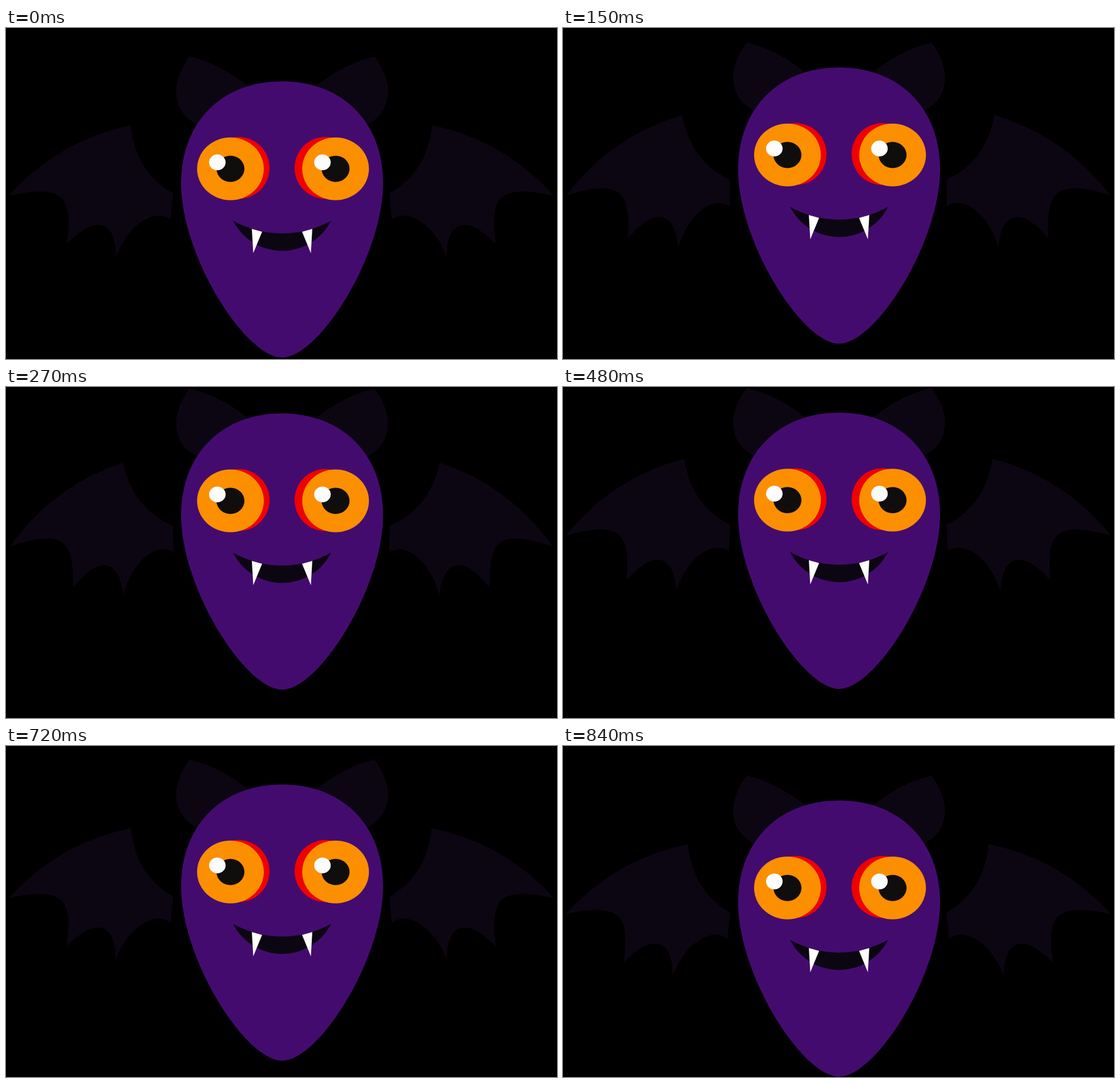
Write an HTML page that moves like this. It is 966x580 px and loops after 0.87 s.

```html
<!DOCTYPE html>
<html lang="en">
<head>
<meta charset="utf-8">
<title>Bat</title>
<style>
  html, body { margin: 0; width: 100%; height: 100%; overflow: hidden; background: #000; }
  svg { display: block; width: 966px; height: 580px; }
</style>
</head>
<body>
<svg viewBox="0 0 966 580">
  <defs>
    <path id="wing" fill="#0c0612" d="M219 170Q227 252 293 290L288.5 336C262 314 213 343 192 402
      C194 340 160 322 106.5 377C116 300 108 270 5 292.5Q92 196 219 170Z"/>
    <path id="ear" fill="#0c0612" d="M333 168C290 145 288 95 322 50Q375 62 426 103L400 180Z"/>
    <g id="eye">
      <ellipse rx="58.5" ry="55" fill="#fb8f00"/>
      <ellipse rx="24.5" ry="23" fill="#100d0d"/>
      <ellipse cx="-23" cy="-11.3" rx="14.5" ry="13.8" fill="#fcfcfc"/>
    </g>
  </defs>
  <g id="bat">
    <g id="leftWing"><use href="#wing"/></g>
    <g transform="matrix(-1 0 0 1 965.3 0)"><g id="rightWing"><use href="#wing"/></g></g>
    <use href="#ear"/>
    <use href="#ear" transform="matrix(-1 0 0 1 968 0)"/>
    <path fill="#440b6f" d="M307 272C307 165 378 93.5 484 93.5S661 165 661 272C661 400 548 577.5 484 577.5S307 400 307 272Z"/>
    <g fill="#f00000">
      <ellipse cx="408" cy="245.2" rx="54" ry="54.3"/>
      <ellipse cx="560" cy="245.2" rx="54" ry="54.3"/>
    </g>
    <use href="#eye" x="393.5" y="246.7"/>
    <use href="#eye" x="577.8" y="246.7"/>
    <path fill="#0c0612" d="M398 337.5A175.6 175.6 0 0 0 570 337.5A96.3 96.3 0 0 1 398 337.5Z"/>
    <path fill="#fcfcfc" d="M431 352L449 357L433.5 394.5ZM537 352L519 357L534.5 394.5Z"/>
  </g>
</svg>
<script>
  const LOOP = 870, STEP = 30;
  const [bat, leftWing, rightWing] = ['bat', 'leftWing', 'rightWing'].map(id => document.getElementById(id));

  // Smooth progress from 0 to 1 between two times
  function ease(t, start, end) {
    const u = Math.min(1, Math.max(0, (t - start) / (end - start)));
    return u * u * (3 - 2 * u);
  }

  function draw(now) {
    const t = Math.floor(now % LOOP / STEP) * STEP;
    const y = -48.5 * ease(t, 0, 300) + 51 * ease(t, 605, 855);
    const angle = -6.8 * (ease(t, -37, 248) - ease(t, 330, 615));
    bat.setAttribute('transform', `translate(0 ${y})`);
    for (const wing of [leftWing, rightWing]) wing.setAttribute('transform', `rotate(${angle} 295 293)`);
  }

  let origin;
  function tick(now) {
    origin ??= now;
    draw(now - origin);
    requestAnimationFrame(tick);
  }
  draw(0);
  requestAnimationFrame(tick);
</script>
</body>
</html>
```
